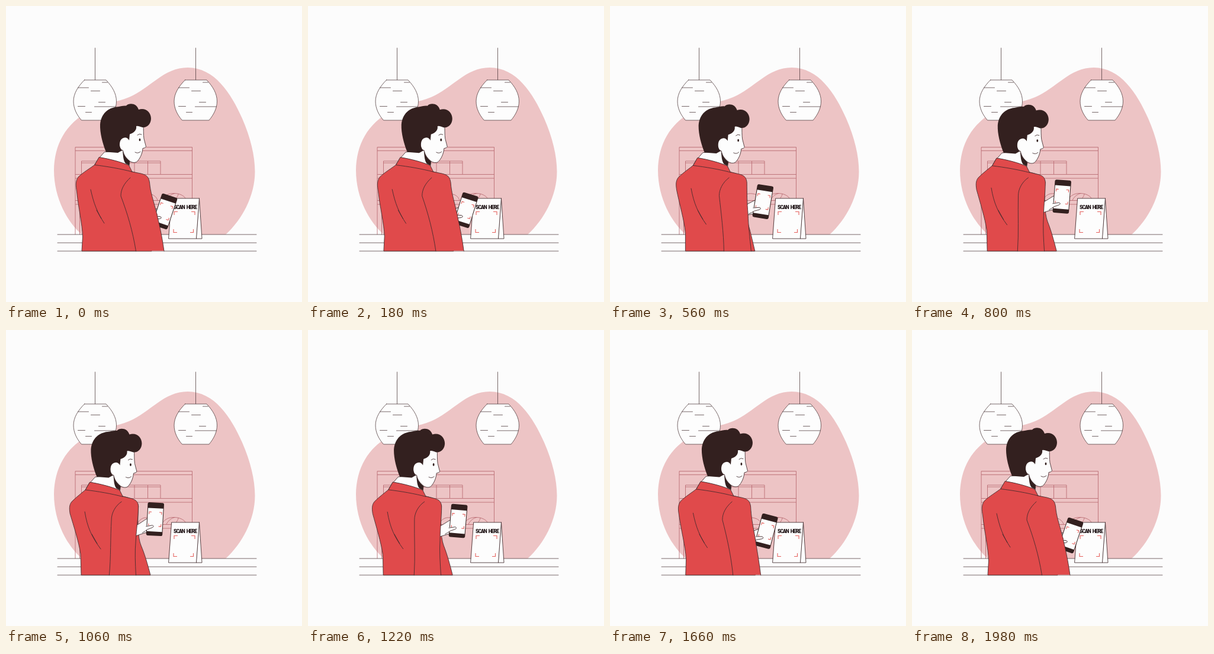
An HTML page for the animation above (2000 ms loop, 500 by 500 pixels).

```html
<!DOCTYPE html>
<html lang="en">
<head>
<meta charset="utf-8">
<title>Scan here</title>
<style>
html, body { margin: 0; width: 100%; height: 100%; overflow: hidden; background: #fcfcfc; }
svg { display: block; width: 100vw; height: 100vh; }
.line { fill: none; stroke: #3f2a2c; stroke-width: .85; stroke-linecap: round; stroke-linejoin: round; }
.thin { stroke: #4b3739; stroke-width: .75; }
.white { fill: #fdfdfd; }
.red { fill: #e04a4b; }
.dark { fill: #33201f; }
.shelf { fill: none; stroke: #b4626a; stroke-width: .8; }
.mark { fill: none; stroke: #e5605c; stroke-width: 1.1; }
text { font: 900 8.5px Roboto, "Liberation Sans", sans-serif; letter-spacing: -1px; word-spacing: 2px; fill: #1d1214; text-anchor: middle; }
</style>
</head>
<body>
<svg viewBox="0 0 500 500">
  <defs>
    <g id="lamp" class="line thin">
      <path d="M0 71V125"/>
      <path class="white" d="M-18 125H18.5C29 136 36 148 36 161C36 173 30 184 22.500 193H-23C-31 184 -36.500 173 -36.500 161C-36.500 148 -29 136 -18 125Z"/>
      <path d="M12 129H21M-29 138H-11M-7 143.500H8M6 162.500H17M-29 169.500H-17M-1 170H35M-16 179.500H-6"/>
    </g>
  </defs>

  <path fill="#edc4c5" d="M128 386C105 366 81 326 81 277C82 235 99 199 143 176C166 163 187 163 208 154C244 139 266 104 307 104C352 104 380 147 399 190C413 222 420.500 253 420.500 280C420.500 320 399 361 371 386Z"/>

  <g class="shelf">
    <path d="M117 386V238.500H314.500V386M117 244.500H314.500M117 284.500H314.500M117 291H314.500M117 328.500H314.500M117 335H314.500M124.500 291V328M124.500 335V386"/>
    <path d="M127.500 284V262H261V284M127.500 265H261M217 262V284M239.500 262V284"/>
    <path d="M222 328C225 319 233 316 240 317C249 318 254 322 256 328M263 328C268 319 276 316 285 316.500C295 317 302 321 305 328M271 328C274 322 279 318 285 316.500M285 328C289 323 291 320 291 317"/>
  </g>

  <use href="#lamp" x="150.500"/>
  <use href="#lamp" x="320.500"/>

  <path class="line thin" d="M87 386H423M87 400H423M87 414H423"/>

  <g class="line">
    <path class="white" d="M326.500 325L331 393H321.500Z"/>
    <path class="white" d="M280 325H326.500L321.500 393H275Z"/>
  </g>
  <text x="302.500" y="343">SCAN HERE</text>
  <path class="mark" d="M284 353V347.500H290M313 347.500H319V353M283 377V382.500H289M311 382.500H316.500V377"/>

  <path id="body" class="line red"/>
  <g id="phone">
    <path class="line white" d="M-31 12C-24 8 -20 4 -14 0L-8 8V22C-14 23 -21 26 -31 30Z"/>
    <rect class="dark" x="-13.800" y="-28" width="27.600" height="56" rx="3"/>
    <path class="white" d="M-12.800 -18.500H12.800V21H-12.800Z"/>
    <path class="mark" d="M-10.500 -8V-12H-6.500M6.500 -12H10.500V-8M-10.500 8V12H-6.500M6.500 12H10.500V8"/>
    <path class="white" d="M-16 9L-14 12L-3 10.500Q0 12.500 -4 14.500L-12 18L-16 21Z"/>
    <path class="line" d="M-14.500 13L-4 10.500Q0 12 -4 14.500L-12 18Q-15 21 -20 24"/>
  </g>
  <path id="sleeve" class="red"/>
  <path id="seams" class="line"/>

  <g id="head">
    <path class="line white" d="M166 247L158 256C176 259 194 264 208 270L209 263L198 244Z"/>
    <path class="line red" d="M157.500 255.500C176 258.500 194 263.500 207.500 269L213 280C194 275 171 271 150 268.500Z"/>
    <path class="dark" d="M197 245C198 253 198 261 202 266L208 269L209 262Z"/>
    <path class="line white" d="M205 200H232C232.500 209 232 217 233 224L236.500 237.500Q235.500 240 231 240.500C230.500 249 226 259 220.500 263.500Q215 266 209 262C203 257 199 252 197.500 244C191 242 190 233 192 227Z"/>
    <path class="dark" d="M169 246.500C163 232 158.500 214 159 200C161 181 173 172 187 170.500C193 169.500 198 168 203 168.500C208 163 221 164 224 175C236 171 245 180 245 190C245 200 237 207 229 204.500C226 203.500 223 202 220 203C221 209 217 214 209 216.500L208 227C205 220 196 221 193 228C191 234 192 240 196 244L189 248Z"/>
    <ellipse class="dark" cx="226" cy="226" rx="1.400" ry="2.300"/>
    <path class="line" d="M222 218Q225 215 229 217M218 247Q223 250 227 246"/>
  </g>
</svg>
<script>
const LOOP = 2000;
const el = id => document.getElementById(id);

// Each shape has a leaning-in pose and a leaning-back pose with the same commands.
const poses = {
  body: [
    "M157 257L150 268C144 273 130 281 122 289C117 296 118 304 119.500 313C122 340 129 368 129.500 390L128 414H246C242 395 241 380 238 365C236 340 237 320 238 296C236 287 225 283 213 280Z",
    "M141 258L134 270C128 275 119 282 111 290C106 296 107 303 108 310C114 330 123 358 126 378L127 414H244C239 395 234 378 228 364C222 350 222 320 223.500 298C223 289 212 284 197 281Z"
  ],
  sleeve: [
    "M210 290C199 300 194 310 194 321C205 350 214 380 219.500 413.500L267 413.500C263 385 258 365 254 348C248 325 244 315 242.500 298C241 289 238 285.500 228 283L213 280Z",
    "M195 290C184 297 178 310 178 320C176 350 177 385 174 413.500L219 413.500C218 395 217 375 219 355C220 335 223 320 223.500 298C223 290 219 286 209 284L197 281Z"
  ],
  seams: [
    "M210 290C199 300 194 310 194 321C205 350 214 380 219.500 414M267 414C263 385 258 365 254 348C248 325 244 315 242.500 298C241 289 238 285.500 228 283L213 280M143 310C148 333 154 349 166 367M153 345L161 359",
    "M195 290C184 297 178 310 178 320C176 350 177 385 174 414M219 414C218 395 217 375 219 355C220 335 223 320 223.500 298C223 290 219 286 209 284L197 281M133 307C137 333 145 350 160 370M145 345L154 361"
  ]
};

const lerp = (a, b, p) => a + (b - a) * p;

function blend([from, to], p) {
  const ends = to.match(/-?[\d.]+/g);
  let i = 0;
  return from.replace(/-?[\d.]+/g, n => lerp(+n, +ends[i++], p).toFixed(2));
}

function draw(time) {
  const p = (1 - Math.cos(time / LOOP * 2 * Math.PI)) / 2;
  for (const id in poses) el(id).setAttribute("d", blend(poses[id], p));
  el("head").setAttribute("transform", `translate(${-15.7 * p} ${1.6 * p})`);
  el("phone").setAttribute("transform",
    `translate(${lerp(268, 251.7, p)} ${lerp(347, 319.3, p)}) rotate(${lerp(18.5, 3, p)})`);
}

const start = performance.now();
function tick() {
  draw((performance.now() - start) % LOOP);
  requestAnimationFrame(tick);
}
tick();
</script>
</body>
</html>
```
